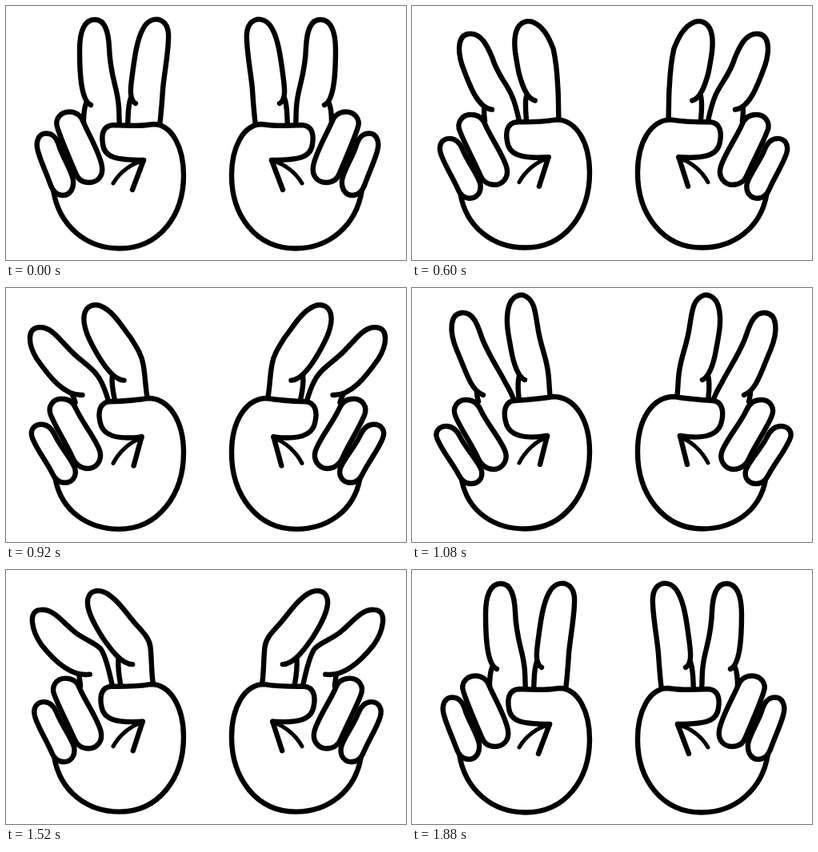
These frames come from a looping animation (500 by 318 pixels, 1.92 s). An HTML page:

```html
<!DOCTYPE html>
<html>
<head>
<meta charset="utf-8">
<title>Air quotes</title>
<style>
html, body { margin: 0; width: 100%; height: 100%; overflow: hidden; background: #fff; }
svg { display: block; width: 500px; height: 318px; }
path { fill: #fff; stroke: #000; stroke-width: 6.4; stroke-linecap: round; stroke-linejoin: round; }
.line { fill: none; }
.thin { fill: none; stroke-width: 5; }
</style>
</head>
<body>
<svg viewBox="0 0 500 318">
  <g id="hand">
    <path id="index"/><path id="indexStem" class="line"/>
    <path id="middle"/><path id="middleStem" class="line"/>
    <path id="palm"/><path id="crease" class="line"/><path id="fold" class="thin"/>
    <path id="pinky"/><path id="ring"/>
  </g>
  <use href="#hand" transform="matrix(-1 0 0 1 504 0)"/>
</svg>
<script>
// Finger outlines in the order: rest, bent, straight, curling, uncurling
const fingers = {
  index: [
    'M106,124 C93,118 92,80 92,55 C92,32 98,17 111,17 C124,17 128,32 129,52 C130,85 138,100 140,118 C142,130 141,140 142,150',
    'M100,134 C72,140 45,116 27,97 C15,84 10,62 27,62 C42,61 56,75 70,82 C82,89 102,93 110,100 C117,107 124,125 129,146',
    'M89,134 C73,128 67,103 56,78 C46,54 47,32 63,31 C78,30 83,50 88,64 C97,86 109,103 117,119 C122,127 126,136 129,144',
    'M99,128 C82,130 70,108 57,85 C42,60 40,36 55,31 C72,28 78,45 86,58 C96,74 118,86 123,102 C127,115 127,130 131,144',
    'M109,125 C93,125 82,105 73,86 C60,60 54,30 70,26 C87,22 94,44 103,60 C111,77 129,86 133,100 C137,115 136,133 139,150'
  ],
  indexStem: [
    'M100,122 C97,130 97,138 97,146',
    'M84,135 C86,138 88,140 89,144',
    'M81,131 C81,135 82,138 83,142',
    'M86,126 C86,132 87,137 89,142',
    'M99,122 C97,130 97,138 97,146'
  ],
  middle: [
    'M162,122 C153,117 156,100 158,85 C161,62 164,42 171,29 C177,17 186,16 191,17 C201,20 204,30 203,43 C202,65 197,90 196,105 C195,120 194,135 192,150',
    'M152,116 C138,118 120,100 107,86 C94,72 80,52 82,40 C84,29 95,28 104,32 C122,40 140,62 155,72 C166,78 171,82 173,92 C176,108 176,125 180,140',
    'M141,115 C133,112 127,95 124,78 C121,60 116,42 121,23 C125,10 134,8 139,9 C154,14 154,32 157,48 C160,70 167,85 169,99 C172,112 171,125 173,139',
    'M154,118 C139,116 132,100 127,82 C120,62 113,40 118,25 C122,14 131,12 137,14 C150,18 153,40 162,60 C169,75 178,84 181,96 C182,110 180,125 181,140',
    'M165,121 C152,118 147,100 142,82 C136,60 132,42 136,27 C140,16 147,15 153,16 C165,20 168,42 173,60 C179,78 190,90 191,103 C191,118 188,133 189,150'
  ],
  middleStem: [
    'M156,115 C152,125 153,138 152,150',
    'M132,111 C132,122 135,132 138,143',
    'M134,110 C131,120 133,130 134,142',
    'M140,112 C138,122 140,132 140,143',
    'M152,112 C149,125 150,138 150,150'
  ]
};

// Remaining parts: upright and tilted outward
const body = {
  palm: [
    'M59,230 C66,275 100,303.5 142,303.5 C192,303.5 222,262 222,212 C222,178 208,148 184,148 C166,151 150,150 134,149 C121,150 119,161 121,173 C123,189 136,193 172,193',
    'M62,240 C70,282 105,301.5 141,301.5 C190,301.5 222,258 222,205 C222,165 204,136 176,136 C160,139 145,140 128,141 C116,142 114,155 117,167 C120,183 136,190 169,185'
  ],
  crease: ['M172,193 L158,230', 'M169,185 L160,221'],
  fold: ['M172,194 C158,196 142,208 134,222', 'M169,187 C155,191 141,205 134,219'],
  ring: [
    'M64.5,153 C60,141 69,132.5 79,132.5 C89,132.5 95,139 97,146 C104,162 118,186 120,201 C122,213 114,221 104,221 C94,221 89,215 87,209 C79,190 70,170 64.5,153Z',
    'M55,162 C49,150 57,139.5 68,140 C78,140 83,146 86,153 C93,169 113,192 117,206 C120,217 112,227 102,227 C93,227 86,221 83,214 C76,198 63,180 55,162Z'
  ],
  pinky: [
    'M40,182 C36,168 42,159.5 50,159.5 C59,159.5 63,165 66,174 C70,188 82,206 84,218 C85,230 79,237 71,237 C63,237 58,231 55,222 C50,208 44,196 40,182Z',
    'M32,190 C27,179 35,173 43,173 C51,173 56,178 60,186 C67,201 84,218 87,229 C89,239 82,245 74,245 C67,245 62,241 59,235 C50,218 39,206 32,190Z'
  ]
};

const tilts = [0, 0.72, 1, 0.68, 0.1];

const linear = k => k;
const easeIn = k => k * k;
const easeOut = k => k * (2 - k);
const smooth = k => k * k * (3 - 2 * k);

// Time, pose weights, easing towards that pose
const keys = [
  [0, [1, 0, 0, 0, 0], linear],
  [420, [1, 0, 0, 0, 0], linear],
  [560, [0.55, 0.15, 0.3, 0, 0], easeIn],
  [760, [0, 1, 0, 0, 0], linear],
  [800, [0, 1.06, -0.06, 0, 0], easeOut],
  [1060, [0, 0, 1, 0, 0], smooth],
  [1160, [0, 0, 1, 0, 0], linear],
  [1360, [0, 0, 0, 1, 0], easeIn],
  [1500, [0, 0.7, 0, -0.2, 0.5], easeOut],
  [1680, [0, 0, 0, 0, 1], easeIn],
  [1860, [1, 0, 0, 0, 0], easeOut],
  [1920, [1, 0, 0, 0, 0], linear]
];

const number = /\d+(\.\d+)?/g;

function blend(paths, weights) {
  const values = paths.map(p => p.match(number));
  let i = 0;
  return paths[0].replace(number, () => {
    const sum = weights.reduce((s, w, n) => s + w * values[n][i], 0);
    i++;
    return sum.toFixed(2);
  });
}

function weightsAt(t) {
  const n = keys.findIndex(key => key[0] > t);
  const [t0, from] = keys[n - 1];
  const [t1, to, ease] = keys[n];
  const k = ease((t - t0) / (t1 - t0));
  return from.map((w, i) => w + (to[i] - w) * k);
}

function show(parts, weights) {
  for (const id in parts)
    document.getElementById(id).setAttribute('d', blend(parts[id], weights));
}

const start = performance.now();

function draw() {
  const elapsed = Math.max(0, performance.now() - start) % 1920;
  const weights = weightsAt(Math.floor(elapsed / 40) * 40);
  const tilt = weights.reduce((s, w, i) => s + w * tilts[i], 0);
  show(fingers, weights);
  show(body, [1 - tilt, tilt]);
  requestAnimationFrame(draw);
}
draw();
</script>
</body>
</html>
```
